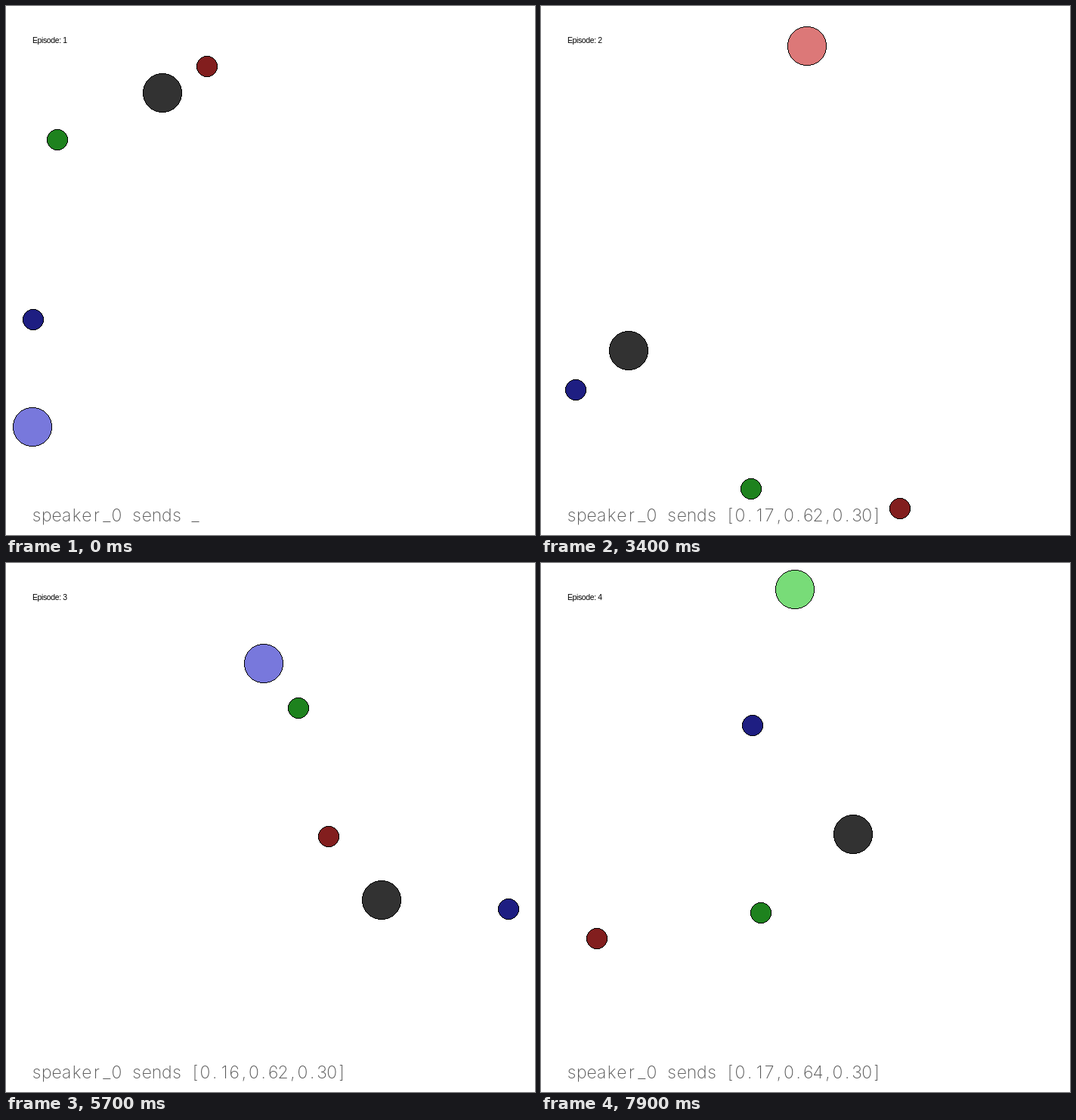
An HTML page with a canvas that plays this animation: 700x700 px, repeating every 8 s.

```html
<!DOCTYPE html>
<html lang="en">
<head>
<meta charset="utf-8">
<title>Speaker and listener</title>
<style>
  html, body { margin: 0; width: 100%; height: 100%; overflow: hidden; background: #fff; }
  canvas, svg { position: absolute; left: 0; top: 0; width: 700px; height: 700px; }
  #episode { font: 10.5px "Liberation Sans", Arial, sans-serif; letter-spacing: -0.4px; }
  .caption { font: 200 23px Inter, Lato, sans-serif; text-anchor: middle; fill: #555; }
</style>
</head>
<body>
<canvas id="stage" width="700" height="700"></canvas>
<svg viewBox="0 0 700 700">
  <text id="episode" x="35" y="49"></text>
  <text class="caption" id="sender" y="682"></text>
  <text class="caption" id="message" y="682"></text>
</svg>
<script>
const LOOP = 8000, STEP = 100, STEPS = 26;
const CENTER = 350, REACH = 315;
const BIG = 26, SMALL = 14;
const RED = "rgb(130,30,30)", GREEN = "rgb(30,130,30)", BLUE = "rgb(30,30,130)", GREY = "rgb(50,50,50)";

// Positions are offsets from the stage centre; drift is the speaker's final speed per step.
const episodes = [
  { tint: "rgb(120,120,220)", says: "[0.16,0.62,0.30]", speaker: [-315, 207.5], drift: [-57.5, -2.26], lag: 0.36,
    listener: [-142.5, -234.5], red: [-83.5, -269.5], green: [-281.5, -172.5], blue: [-313.5, 65.5] },
  { tint: "rgb(220,120,120)", says: "[0.17,0.62,0.30]", speaker: [298.2, -279], drift: [-59.1, -3.4], lag: 0.175,
    listener: [-233.5, 106.5], red: [125.5, 315], green: [-71.5, 289.5], blue: [-303.5, 158.5] },
  { tint: "rgb(120,120,220)", says: "[0.16,0.62,0.30]", speaker: [141.5, -211.3], drift: [-60, -2.2], lag: 0.16,
    listener: [147.4, 96.3], red: [77.7, 12.8], green: [37.3, -157.2], blue: [315, 108.95] },
  { tint: "rgb(120,220,120)", says: "[0.17,0.64,0.30]", speaker: [-1, -314.5], drift: [-59, -2.4], lag: 0.16,
    listener: [63.5, 9.5], red: [-275.5, 147.5], green: [-58.5, 113.5], blue: [-69.5, -134.5] }
];

const byId = id => document.getElementById(id);
const ctx = byId("stage").getContext("2d");

// Damped push from rest: each step keeps 75% of the speed and adds a thrust.
function travel(steps, lag) {
  let speed = 0, distance = 0;
  for (let k = 0; k < steps; k++) {
    speed = speed * 0.75 + 0.25 * (1 - lag * 0.5 ** k);
    distance += speed;
  }
  return distance;
}

// Hard-edged disc with a one-pixel black rim.
function disc(x, y, r, color) {
  const half = row => Math.round(Math.sqrt(Math.max(0, r * r - (row + 0.5) ** 2)));
  for (let row = -r; row < r; row++) {
    const w = half(row);
    const inner = Math.min(w - 1, half(row - 1), half(row + 1));
    ctx.fillStyle = "#000";
    ctx.fillRect(x - w, y + row, 2 * w, 1);
    if (inner > 0) {
      ctx.fillStyle = color;
      ctx.fillRect(x - inner, y + row, 2 * inner, 1);
    }
  }
}

// Sets text on an even pitch, each letter centred in its cell.
function typeset(id, text, x, pitch) {
  const line = byId(id);
  line.setAttribute("x", [...text].map((_, i) => x + i * pitch).join(" "));
  line.textContent = text;
}

function draw(tick) {
  const index = Math.floor(tick / STEPS), step = tick % STEPS;
  const ep = episodes[index];
  const moved = travel(step, ep.lag);
  const speaker = ep.speaker.map((v, i) => v + ep.drift[i] * moved);
  const bodies = [
    [speaker, BIG, ep.tint], [ep.listener, BIG, GREY],
    [ep.red, SMALL, RED], [ep.green, SMALL, GREEN], [ep.blue, SMALL, BLUE]
  ];
  // The camera zooms so that the farthest body stays in view.
  const zoom = REACH / Math.max(...bodies.flatMap(([p]) => p.map(Math.abs)));
  ctx.fillStyle = "#fff";
  ctx.fillRect(0, 0, 700, 700);
  for (const [p, r, color] of bodies) {
    const [x, y] = p.map(v => Math.floor(CENTER + v * zoom + 1e-6));
    disc(x, y, r, color);
  }
  byId("episode").textContent = "Episode: " + (index + 1);
  typeset("message", step ? ep.says : "_", 250.5, 12.9);
}

typeset("sender", "speaker_0 sends", 40.5, 13.25);

const start = performance.now();
let shown = -1;
function play() {
  const tick = Math.floor(((performance.now() - start) % LOOP) / STEP);
  if (tick !== shown) draw(shown = tick);
  requestAnimationFrame(play);
}
play();
</script>
</body>
</html>
```
